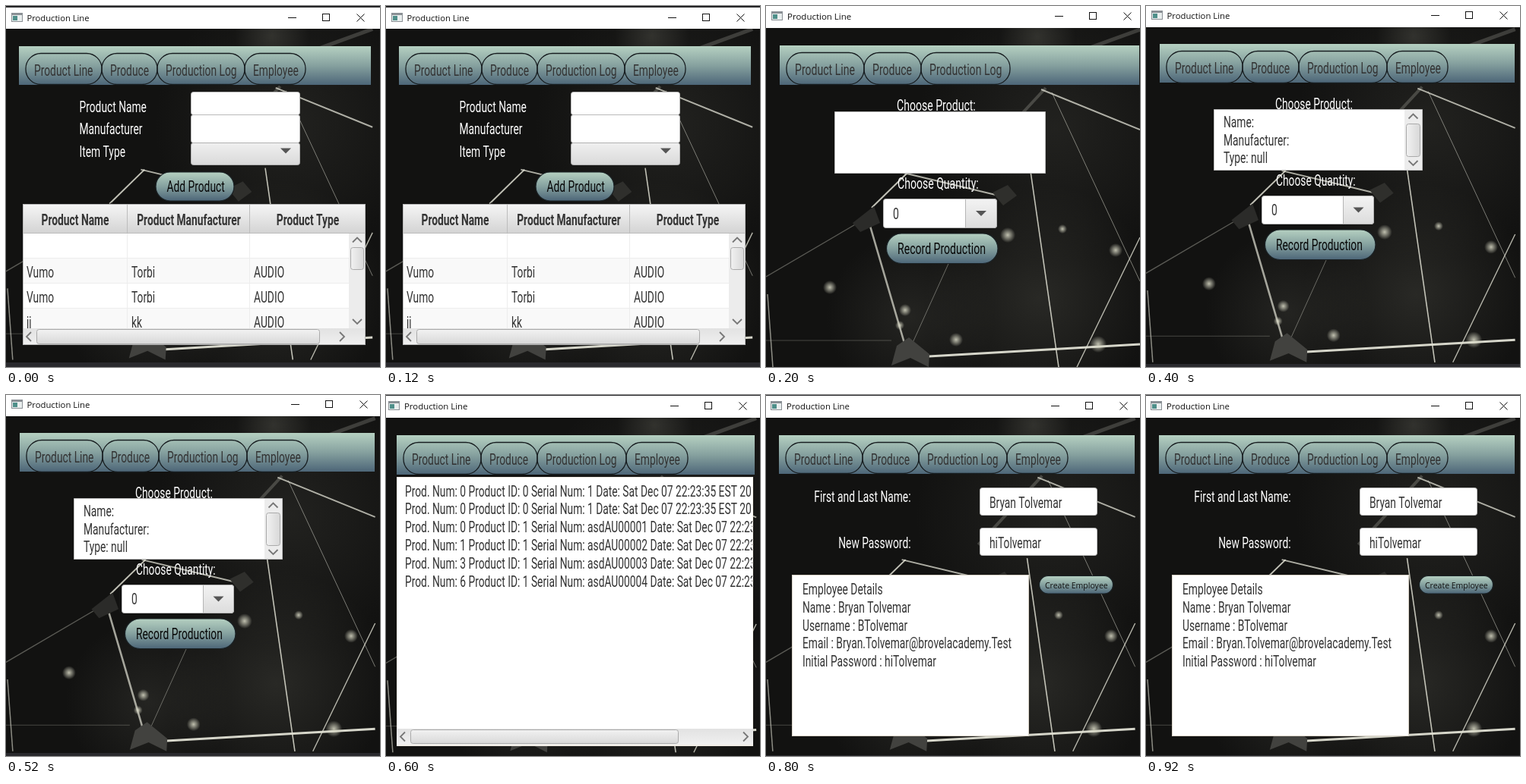
These frames come from a looping animation (492x476 px, 1000 ms). An HTML page with a canvas:

```html
<!DOCTYPE html>
<html lang="en">
<head>
<meta charset="utf-8">
<title>Production Line</title>
<style>
html, body { margin: 0; width: 100%; height: 100%; overflow: hidden; background: #111; }
canvas { display: block; }
</style>
</head>
<body>
<canvas id="stage" width="492" height="476"></canvas>
<script>
const W = 492, H = 476, STEP = 200;
const ctx = document.getElementById('stage').getContext('2d');
const INK = '#333', WHITE = '#fff';
const NARROW = 0.69; // condensed look shared by all interface text

function rect(x, y, x2, y2, fill) {
  ctx.fillStyle = fill;
  ctx.fillRect(x, y, x2 - x, y2 - y);
}

function shade(y, y2, ...colors) {
  const g = ctx.createLinearGradient(0, y, 0, y2);
  colors.forEach((c, i) => g.addColorStop(i / (colors.length - 1), c));
  return g;
}

function round(x, y, x2, y2, r, fill, stroke, width = 1) {
  ctx.beginPath();
  ctx.roundRect(x, y, x2 - x, y2 - y, r);
  if (fill) { ctx.fillStyle = fill; ctx.fill(); }
  if (stroke) { ctx.strokeStyle = stroke; ctx.lineWidth = width; ctx.stroke(); }
}

function path(points, color, width = 1) {
  ctx.beginPath();
  points.forEach(([x, y]) => ctx.lineTo(x, y));
  ctx.strokeStyle = color;
  ctx.lineWidth = width;
  ctx.stroke();
}

function shape(points, fill) {
  ctx.beginPath();
  points.forEach(([x, y]) => ctx.lineTo(x, y));
  ctx.fillStyle = fill;
  ctx.fill();
}

function text(str, x, y, color = INK, { size = 20, weight = 400, align = 'left' } = {}) {
  ctx.save();
  ctx.translate(x, y);
  ctx.scale(NARROW, 1);
  ctx.font = `${weight} ${size}px Roboto, sans-serif`;
  ctx.textAlign = align;
  ctx.fillStyle = color;
  ctx.fillText(str, 0, 0);
  ctx.restore();
}

function plain(str, x, y, size) {
  ctx.font = `${size}px "Open Sans", sans-serif`;
  ctx.textAlign = 'left';
  ctx.fillStyle = '#111';
  ctx.fillText(str, x, y);
}

// x1, y1, x2, y2, width, opacity
const WIRES = [
  [348, 218, 385, 476, 1.6, .85], [376, 114, 492, 363, 1, .5],
  [492, 305, 409, 476, 1.4, .8], [134, 280, 186, 458, 2.6, .7],
  [0, 357, 126, 283, 1.3, .35], [139, 266, 186, 220, 2, .85],
  [181, 220, 302, 249, 2, .75], [214, 462, 492, 446, 3, .95],
  [283, 200, 368, 108, 4, .22], [362, 110, 492, 163, 2, .75],
  [258, 300, 192, 446, 1, .4], [357, 80, 492, 31, 5, .2],
  [2, 380, 9, 476, 1.5, .6], [0, 441, 165, 441, 1, .25]
];
const GLOWS = [[318, 302, 10], [84, 371, 9], [183, 401, 8], [176, 421, 6],
  [250, 440, 9], [437, 446, 11], [460, 322, 9], [390, 294, 6], [478, 70, 9]];

function glow(x, y, r, rgb, a) {
  const g = ctx.createRadialGradient(x, y, 0, x, y, r);
  g.addColorStop(0, `rgba(${rgb},${a})`);
  g.addColorStop(1, `rgba(${rgb},0)`);
  ctx.fillStyle = g;
  ctx.fillRect(x - r, y - r, r * 2, r * 2);
}

function backdrop(scale) {
  rect(0, 0, W, H, '#121211');
  ctx.save();
  ctx.scale(scale, scale);
  glow(380, 160, 180, '70,70,64', .3);
  glow(360, 385, 150, '75,75,68', .4);
  glow(190, 410, 110, '70,70,64', .35);
  glow(357, 40, 50, '90,90,82', .4);
  for (const [x, y, x2, y2, w, a] of WIRES) path([[x, y], [x2, y2]], `rgba(225,225,212,${a})`, w);
  shape([[165, 474], [172, 448], [188, 437], [215, 459], [214, 476], [190, 464]], '#42423f');
  shape([[114, 286], [142, 264], [150, 286], [124, 298]], '#2b2b29');
  shape([[298, 246], [318, 236], [330, 250], [312, 263]], '#2f2f2c');
  GLOWS.forEach(([x, y, r]) => glow(x, y, r, '220,220,200', .85));
  ctx.restore();
}

function titleBar({ top, bar, icon, title, titleSize, ctrl, mid }) {
  rect(0, 0, W, top, '#252527');
  rect(0, top, W, bar, WHITE);
  rect(icon, mid - 6, icon + 15, mid + 6, '#8a9095');
  rect(icon + 1, mid - 3, icon + 14, mid + 5, '#e9eeee');
  rect(icon + 2, mid - 2, icon + 8, mid + 4, '#4f8f8a');
  plain('Production Line', title, mid + 4.5, titleSize);
  const y = mid + .5;
  path([[ctrl, y], [ctrl + 11, y]], '#111');
  ctx.strokeRect(ctrl + 45.5, y - 5, 9, 9);
  path([[ctrl + 90.5, y - 5], [ctrl + 100.5, y + 5]], '#111');
  path([[ctrl + 100.5, y - 5], [ctrl + 90.5, y + 5]], '#111');
}

const TABS = ['Product Line', 'Produce', 'Production Log', 'Employee'];

function toolbar({ box: [x, y, x2, y2], edges, tabY: [a, b], size }) {
  rect(x, y, x2, y2, shade(y, y2, '#b5d0c1', '#86a19f', '#4d6678'));
  for (let i = 0; i < edges.length - 1; i++) {
    round(edges[i], a + .5, edges[i + 1], b - .5, 20, null, '#171d20', 1.3);
    text(TABS[i], edges[i] + 11, (a + b) / 2 + 8.5, INK, { size });
  }
}

function pill(x, y, x2, y2) {
  round(x, y, x2, y2, (y2 - y) / 2, shade(y, y2, '#b5d0c1', '#85a19f', '#4d6678'), '#1a2226', 1.2);
}

function button(label, x, y, x2, y2, size) {
  pill(x, y, x2, y2);
  text(label, x + 14.5, (y + y2) / 2 + 7, '#080808', { size });
}

function field(x, y, x2, y2, r = 3) {
  round(x + .5, y + .5, x2 - .5, y2 - .5, r, WHITE, '#b9b9b9');
}

function dropArrow(x, y) {
  shape([[x - 7, y - 3.5], [x + 7, y - 3.5], [x, y + 3.5]], '#555');
}

function chevron(x, y, dx, dy) {
  const tip = [x + dx * 3, y + dy * 3];
  const side = s => [x - dx * 3 + dy * 6 * s, y - dy * 3 + dx * 6 * s];
  path([side(1), tip, side(-1)], '#777', 1.8);
}

function scrollV(x, y, x2, y2, t, t2) {
  rect(x, y, x2, y2, '#ececec');
  const mid = (x + x2) / 2;
  chevron(mid, y + 8.5, 0, -1);
  chevron(mid, y2 - 9, 0, 1);
  const g = ctx.createLinearGradient(x, 0, x2, 0);
  g.addColorStop(0, '#f5f5f5');
  g.addColorStop(1, '#d4d4d4');
  round(x + 2.5, t + .5, x2 - 2.5, t2 - .5, 3, g, '#aaa');
}

function scrollH(x, y, x2, y2, t, t2, right) {
  rect(x, y, x2, y2, shade(y, y2, '#e2e2e2', '#f0f0f0'));
  const mid = (y + y2) / 2;
  chevron(x + 8, mid, -1, 0);
  chevron(right, mid, 1, 0);
  round(t + .5, y + 1.5, t2 - .5, y2 - 1.5, 3, shade(y, y2, '#f4f4f4', '#d6d6d6'), '#aaa');
}

function table() {
  const cols = [22, 160, 321, 473];
  const heads = ['Product Name', 'Product Manufacturer', 'Product Type'];
  const rows = [[], ['Vumo', 'Torbi', 'AUDIO'], ['Vumo', 'Torbi', 'AUDIO'], ['jj', 'kk', 'AUDIO']];
  rect(22, 261, 473, 447, WHITE);
  rect(22, 261, 473, 300, shade(261, 300, '#f6f6f6', '#d3d3d3'));
  heads.forEach((h, i) => {
    text(h, (cols[i] + cols[i + 1]) / 2, 289, INK, { weight: 700, align: 'center' });
    if (i) rect(cols[i] - 1, 261, cols[i], 300, '#bdbdbd');
  });
  rect(22, 299, 473, 300, '#bbb');
  ctx.save();
  ctx.beginPath();
  ctx.rect(22, 300, 429, 125);
  ctx.clip();
  rows.forEach((row, i) => {
    const y = 300 + i * 33;
    rect(22, y, 451, y + 33, i % 2 ? '#f9f9f9' : WHITE);
    rect(22, y + 32, 451, y + 33, '#ededed');
    row.forEach((cell, c) => text(cell, cols[c] + 5, y + 25));
  });
  rect(159, 300, 160, 425, '#ededed');
  rect(320, 300, 321, 425, '#ededed');
  ctx.restore();
  scrollV(451, 300, 473, 425, 318, 348);
  scrollH(22, 425, 473, 447, 40, 413, 442);
  ctx.strokeStyle = '#b5b5b5';
  ctx.lineWidth = 1;
  ctx.strokeRect(22.5, 261.5, 450, 185);
}

function productLine() {
  ['Product Name', 'Manufacturer', 'Item Type'].forEach((s, i) => text(s, 96.5, 139.5 + i * 29.5, WHITE));
  field(243, 113, 387, 144);
  field(243, 143, 387, 181);
  round(243.5, 180.5, 386.5, 209.5, 3, shade(180, 209, '#f0f0f0', '#dadada'), '#b0b0b0');
  dropArrow(368, 191);
  button('Add Product', 197, 219, 300, 257);
  table();
}

function combo(x, y, x2, y2, split, size) {
  field(x, y, x2, y2);
  round(split + .5, y + .5, x2 - .5, y2 - .5, [0, 3, 3, 0], shade(y, y2, '#f3f3f3', '#dcdcdc'), '#b5b5b5');
  dropArrow((split + x2) / 2, (y + y2) / 2);
  text('0', x + 13, (y + y2) / 2 + 7, INK, { size });
}

function produceEmpty({ size }) {
  text('Choose Product:', 172, 138, WHITE, { size });
  field(90, 139, 368, 221, 0);
  text('Choose Quantity:', 173, 241, WHITE, { size });
  combo(154, 254, 304, 293, 262, size);
  button('Record Production', 158.5, 300, 305, 339.5, size);
}

function produceFilled() {
  text('Choose Product:', 170, 135.5, WHITE);
  field(89, 136, 364, 217, 0);
  ['Name:', 'Manufacturer:', 'Type: null'].forEach((s, i) => text(s, 102, 160 + i * 23.7));
  scrollV(340, 137, 363, 216, 155, 199);
  text('Choose Quantity:', 171, 237, WHITE);
  combo(152, 250, 300, 288, 259);
  button('Record Production', 156.5, 295, 302, 334.5);
}

function productionLog() {
  const log = [[0, 0, '1'], [0, 0, '1'], [0, 1, 'asdAU00001'], [1, 1, 'asdAU00002'],
    [3, 1, 'asdAU00003'], [6, 1, 'asdAU00004']];
  rect(14, 108, 483, 463, '#f1ede6');
  rect(15, 109, 482, 460, WHITE);
  ctx.save();
  ctx.beginPath();
  ctx.rect(15, 109, 467, 330);
  ctx.clip();
  log.forEach(([num, id, serial], i) =>
    text(`Prod. Num: ${num} Product ID: ${id} Serial Num: ${serial} Date: Sat Dec 07 22:23:35 EST 2019`, 25, 133.5 + i * 23.9));
  ctx.restore();
  scrollH(14, 440, 483, 461, 32, 385, 473);
}

function employee() {
  text('First and Last Name:', 190.5, 141, WHITE, { align: 'right' });
  text('New Password:', 190.5, 202, WHITE, { align: 'right' });
  field(281, 122, 436, 159);
  field(281, 175, 436, 212);
  text('Bryan Tolvemar', 294, 149);
  text('hiTolvemar', 294, 202);
  rect(34, 237, 346, 450, '#d9d3c8');
  rect(35, 238, 345, 449, WHITE);
  ['Employee Details', 'Name : Bryan Tolvemar', 'Username : BTolvemar',
    'Email : Bryan.Tolvemar@brovelacademy.Test', 'Initial Password : hiTolvemar'
  ].forEach((s, i) => text(s, 48, 263 + i * 23.8));
  pill(359.5, 238.5, 456.5, 262);
  plain('Create Employee', 367, 254.5, 10.5);
}

const SCENES = [
  { top: 2, bar: 30, icon: 7, title: 27.5, titleSize: 11.2, ctrl: 371, mid: 15, scale: .98, bottom: 470, size: 20,
    box: [17, 53, 480, 104], edges: [26, 126, 199, 314, 394], tabY: [62, 104], draw: productLine },
  { top: 0, bar: 29, icon: 7, title: 28, titleSize: 11.5, ctrl: 380, mid: 13, scale: 1, bottom: 476, size: 20.4,
    box: [18, 52, 491, 104], edges: [27, 129, 204, 321], tabY: [61, 104], draw: produceEmpty },
  { top: 0, bar: 28, icon: 7, title: 27.5, titleSize: 11.3, ctrl: 375, mid: 12, scale: .987, bottom: 472, size: 20,
    box: [18, 50, 485, 101], edges: [27, 127, 201, 317, 397], tabY: [59, 102], draw: produceFilled },
  { top: 1, bar: 30, icon: 3, title: 24, titleSize: 11.4, ctrl: 374, mid: 14, scale: .99, bottom: 476, size: 20,
    box: [14, 53, 485, 105], edges: [23, 125, 199, 316, 397], tabY: [62, 105], draw: productionLog },
  { top: 1, bar: 30, icon: 6, title: 27, titleSize: 11.3, ctrl: 375, mid: 14, scale: .987, bottom: 475, size: 20,
    box: [17, 53, 485, 104], edges: [26, 127, 201, 317, 397], tabY: [62, 104], draw: employee }
];

function render(scene) {
  backdrop(scene.scale);
  rect(0, scene.bottom, W, H, '#2a2a2e');
  titleBar(scene);
  toolbar(scene);
  scene.draw(scene);
}

const start = performance.now();
let shown = -1;

function tick() {
  const i = Math.floor((performance.now() - start) / STEP) % SCENES.length;
  if (i !== shown) render(SCENES[shown = i]);
  requestAnimationFrame(tick);
}
tick();
</script>
</body>
</html>
```
